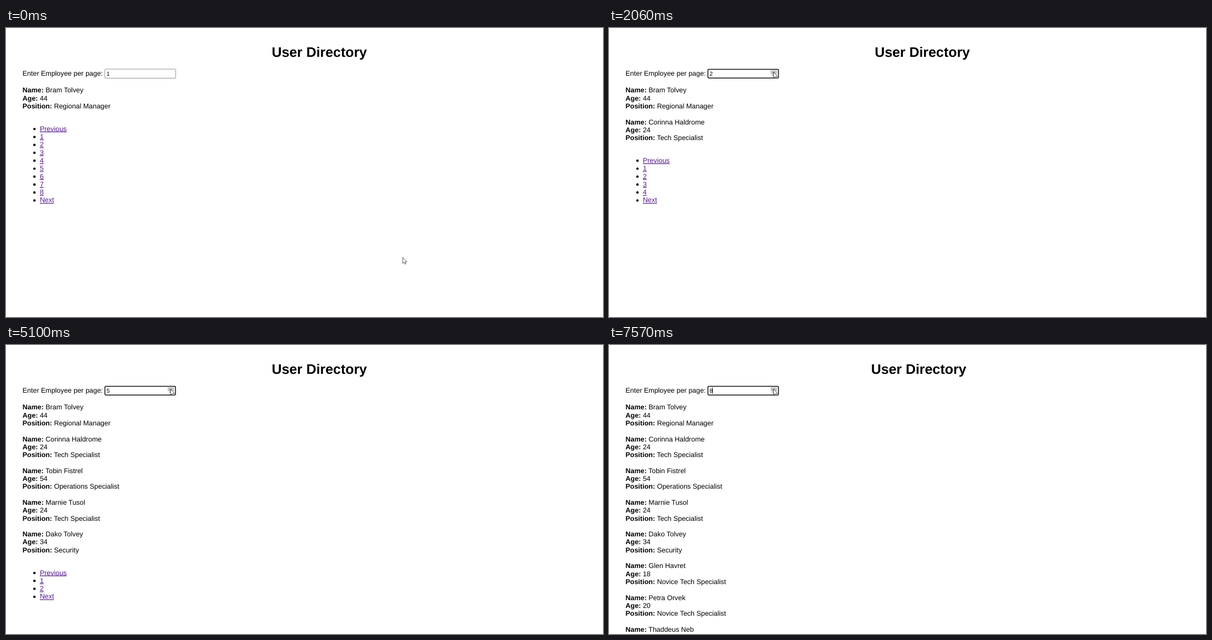
Animation of 1075 by 521 pixels, one loop 8000 ms. Source, as an HTML page:

```html
<!DOCTYPE html>
<html lang="en">
<head>
<meta charset="utf-8">
<title>User Directory</title>
<style>
  html, body { margin: 0; width: 100%; height: 100%; overflow: hidden; background: #fff; }
  svg { display: block; width: 1075px; height: 521px; }
  text { font: 12.44px "Liberation Sans", Arial, sans-serif; text-rendering: geometricPrecision; white-space: pre; }
  .title { font-size: 24.88px; font-weight: bold; text-anchor: middle; }
  .label { font-weight: bold; }
  .link { fill: #551a8b; text-decoration: underline; }
  #value { font-size: 10.36px; }
  #glow { mix-blend-mode: multiply; }
</style>
</head>
<body>
<svg viewBox="0 0 1075 521">
  <text class="title" id="title" y="51.5">User Directory</text>
  <text x="29.8" y="85.8">Enter Employee per page:</text>
  <rect id="box" fill="#fff"/>
  <text id="value" x="180.9" y="86"></text>
  <rect id="caret" x="186" y="76.4" width=".8" height="11.4"/>
  <g id="spinner">
    <rect x="291" y="76.3" width="11.8" height="12.4" fill="#f0f0f0"/>
    <rect id="up" x="291" y="76.3" width="11.8" height="6.6"/>
    <path d="M294 82l2.8-3.2 2.8 3.2zM294 84.2h5.6l-2.8 3.2z" fill="#505050"/>
  </g>
  <g id="people"></g>
  <g id="pages"></g>
  <circle id="glow" cx="295.5" cy="78.5" r="9.3" fill="#f7ea5c"/>
  <path id="arrow" d="M0 0V10.8L2.5 8.6 4.1 12.3 5.7 11.6 4.1 8H7.3Z" fill="#fff" stroke="#333" stroke-width=".8"/>
  <path id="beam" d="M-2-4.6H2M0-4.6V4.6M-2 4.6H2" fill="none" stroke="#333" stroke-width=".9"/>
</svg>
<script>
const LOOP = 8000, LINE = 14.304, BLOCK = 4 * LINE, LEFT = 29.8;
const STEP = 74, GLOW = 80, BLINK = 540;
const $ = id => document.getElementById(id);

const people = [
  ["Bram Tolvey", 44, "Regional Manager"],
  ["Corinna Haldrome", 24, "Tech Specialist"],
  ["Tobin Fistrel", 54, "Operations Specialist"],
  ["Marnie Tusol", 24, "Tech Specialist"],
  ["Dako Tolvey", 34, "Security"],
  ["Glen Havret", 18, "Novice Tech Specialist"],
  ["Petra Orvek", 20, "Novice Tech Specialist"],
  ["Thaddeus Neb", 31, "Novice Tech Specialist"]
];

const clicks = [1510, 2360, 3450, 4550, 5650, 6570, 7490];

// pointer stops, timed in steps of the pointer
const stops = [
  { at: 0, x: 714.5, y: 413.5 },
  { at: 8, x: 300, y: 59 },
  { at: 10, x: 296.6, y: 91.2 },
  { at: 12, x: 296.4, y: 95 },
  { at: 16, x: 296.2, y: 79.2 }
];

const show = (id, on) => $(id).setAttribute("visibility", on ? "visible" : "hidden");
const set = (id, attrs) => Object.entries(attrs).forEach(([k, v]) => $(id).setAttribute(k, v));
const ease = p => p * p * (3 - 2 * p);

function pointer(t) {
  const step = Math.floor(t / STEP);
  const next = stops.findIndex(s => s.at > step);
  if (next < 0) return stops[stops.length - 1];
  const a = stops[next - 1], b = stops[next];
  const p = ease((step - a.at) / (b.at - a.at));
  return { x: a.x + (b.x - a.x) * p, y: a.y + (b.y - a.y) * p };
}

function field(y, label, value) {
  return `<text x="${LEFT}" y="${y}"><tspan class="label">${label}:</tspan> ${value}</text>`;
}

function layout(count) {
  $("people").innerHTML = people.slice(0, count).map(([name, age, job], i) => {
    const y = 116.3 + i * BLOCK;
    return field(y, "Name", name) + field(y + LINE, "Age", age) + field(y + 2 * LINE, "Position", job);
  }).join("");

  const numbers = Array.from({ length: Math.ceil(people.length / count) }, (_, i) => i + 1);
  const top = 185.7 + (count - 1) * BLOCK;
  $("pages").innerHTML = ["Previous", ...numbers, "Next"].map((name, i) => {
    const y = top + i * LINE;
    return `<circle cx="51.2" cy="${y - 3.6}" r="2.2"/><text class="link" x="60.9" y="${y}">${name}</text>`;
  }).join("");

  $("value").textContent = count;
  // the scrollbar narrows the page once the list overflows
  set("title", { x: count > 5 ? 557.7 : 564.2 });
}

function styleBox(focused, hovered) {
  const w = focused ? 1.5 : 0.8;
  set("box", {
    x: 177.4 + w / 2, y: 73.7 + w / 2, width: 128.6 - w, height: 17.2 - w, rx: 1.6,
    "stroke-width": w, stroke: focused ? "#101010" : hovered ? "#4f4f4f" : "#767676"
  });
}

let shown = 0;
function draw(t) {
  const done = clicks.filter(c => c <= t);
  const focused = done.length > 0;
  const since = focused ? t - done[done.length - 1] : Infinity;
  const count = done.length + 1;
  if (count !== shown) layout(shown = count);

  const { x, y } = pointer(t);
  const hovered = x < 306 && y > 74;
  const beam = hovered && y > 88;
  const pressed = since < GLOW;

  styleBox(focused, hovered);
  show("spinner", hovered);
  show("up", hovered && !beam);
  set("up", { fill: pressed ? "#a0a0a0" : "#c9c9c9" });
  show("caret", since < BLINK);
  show("glow", pressed);
  show("arrow", !beam);
  show("beam", beam);
  set(beam ? "beam" : "arrow", { transform: `translate(${x} ${y})` });
}

const start = performance.now();
function tick() {
  draw((performance.now() - start) % LOOP);
  requestAnimationFrame(tick);
}
tick();
</script>
</body>
</html>
```
